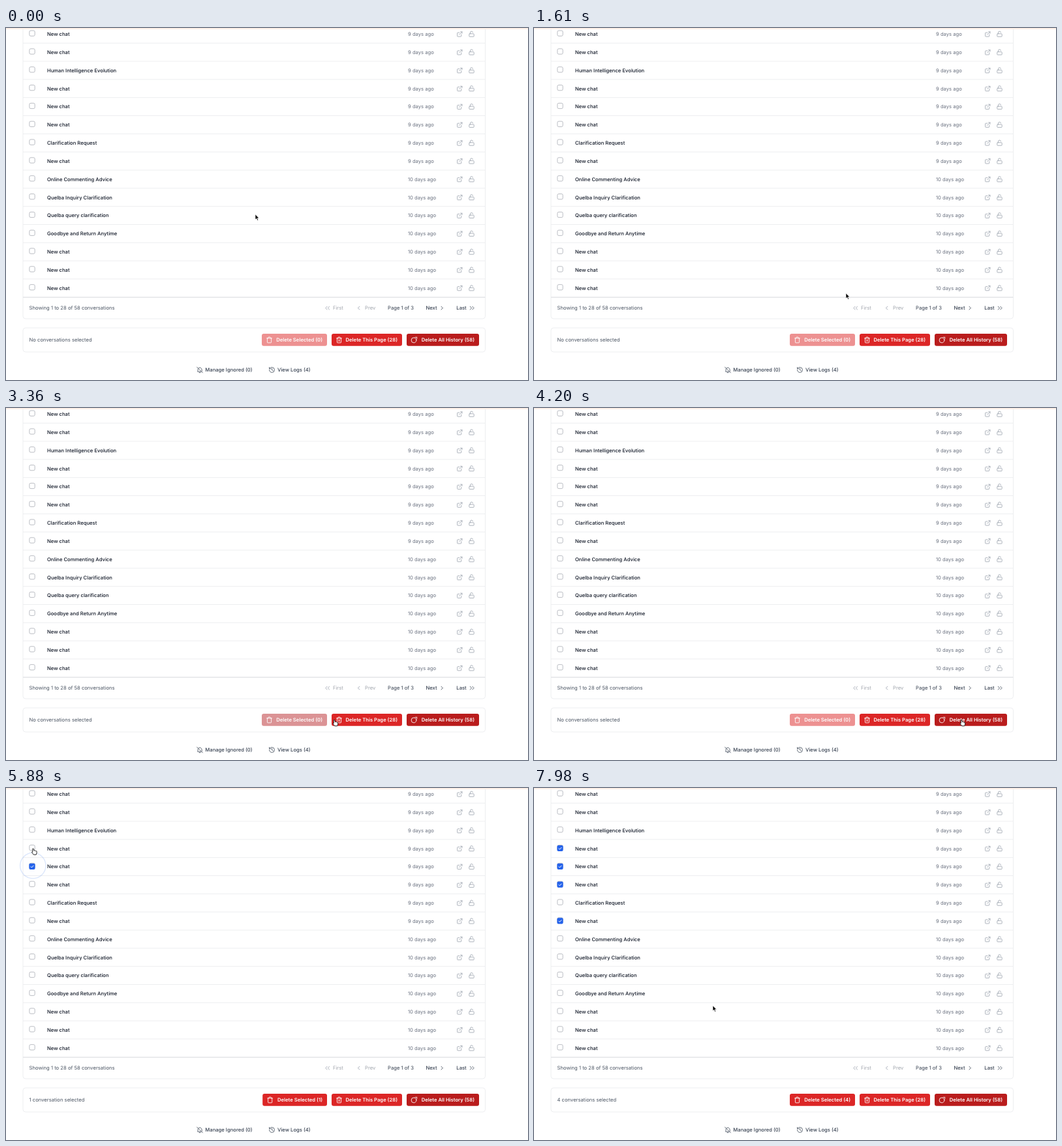
These frames come from a looping animation (800x540 px, 8 s). An HTML page:

```html
<!DOCTYPE html>
<html lang="en">
<head>
<meta charset="utf-8">
<title>Conversation list</title>
<style>
html, body { margin: 0; width: 100%; height: 100%; overflow: hidden; background: #fff; }
svg { display: block; width: 800px; height: 540px; }
text { font: 400 7.66px Inter, sans-serif; fill: #4b5563; white-space: pre; text-rendering: geometricPrecision; }
.title { font-weight: 500; fill: #111827; }
.date { fill: #6b7280; }
.nav { font-weight: 500; fill: #374151; }
.off { font-weight: 400; fill: #a1a5ad; }
.label { font-weight: 600; fill: #fff; }
.icon { fill: none; stroke: #9ca3af; stroke-width: 2; stroke-linecap: round; stroke-linejoin: round; }
.dark { stroke: #4b5563; }
.white { stroke: #fff; }
.line { fill: none; stroke: #ebecef; stroke-width: .9; }
.box { fill: #fff; stroke: #a9adb4; stroke-width: .8; }
</style>
</head>
<body>
<svg id="stage" viewBox="0 0 800 540" xmlns="http://www.w3.org/2000/svg"></svg>
<script>
const LOOP = 8000, STEP = 70, ROW_TOP = 9.3, ROW_GAP = 27.83;
const stage = document.getElementById('stage');

const titles = Array(15).fill('New chat');
Object.assign(titles, {
  2: 'Human Intelligence Evolution', 6: 'Clarification Request',
  8: 'Online Commenting Advice', 9: 'Quelba Inquiry Clarification',
  10: 'Quelba query clarification', 11: 'Goodbye and Return Anytime'
});

const icons = {
  link: 'M15 3h6v6M10 14 21 3M18 13v6a2 2 0 0 1-2 2H5a2 2 0 0 1-2-2V8a2 2 0 0 1 2-2h6',
  lock: 'M5 11h14a2 2 0 0 1 2 2v7a2 2 0 0 1-2 2H5a2 2 0 0 1-2-2v-7a2 2 0 0 1 2-2M7 11V7a5 5 0 0 1 9.9-1',
  trash: 'M3 6h18M19 6v14a2 2 0 0 1-2 2H7a2 2 0 0 1-2-2V6M8 6V4a2 2 0 0 1 2-2h4a2 2 0 0 1 2 2v2',
  bomb: 'M20 13a9 9 0 1 1-18 0a9 9 0 0 1 18 0M14.4 4.6l1.9-1.9a2.4 2.4 0 0 1 3.4 0l1.6 1.6a2.4 2.4 0 0 1 0 3.4l-1.9 2M22 2l-1.5 1.5',
  muted: 'M2 2l20 20M9 4.5a7 7 0 0 1 10 6.5c0 2 .4 3.5 1 5M17 18H4c1-2 1.5-4 1.5-8a7 7 0 0 1 .8-3M10 21.5h4',
  history: 'M3 12a9 9 0 1 0 9-9 9.8 9.8 0 0 0-6.7 2.7L3 8M3 3v5h5M12 7v5l4 2'
};
icons.trashX = icons.trash + 'M10 11l4 6M14 11l-4 6';

function add(tag, attrs, parent = stage, content) {
  const el = document.createElementNS('http://www.w3.org/2000/svg', tag);
  for (const key in attrs) el.setAttribute(key, attrs[key]);
  if (content !== undefined) el.textContent = content;
  parent.append(el);
  return el;
}
const write = (x, y, content, cls = '', parent = stage) =>
  add('text', { x, y, class: cls }, parent, content);
const icon = (name, cx, cy, cls = '', parent = stage, size = 10.5) =>
  add('path', {
    d: icons[name], class: 'icon ' + cls,
    transform: `translate(${cx - size / 2} ${cy - size / 2}) scale(${size / 24})`
  }, parent);
const path = (d, cls) => add('path', { d, class: cls });
const rowY = i => ROW_TOP + ROW_GAP * i;

add('rect', { width: 800, height: 2, fill: '#fdf0e8' });
path('M26 2V442q0 4 4 4H730.5q4 0 4-4V2', 'line');
add('rect', { x: 26, y: 460, width: 708.5, height: 37, rx: 4, class: 'line' });

const rows = titles.map((title, i) => {
  const y = rowY(i);
  path(`M26 ${y + 13.9}H734.5`, 'line');
  add('rect', { x: 35.9, y: y - 5.3, width: 8.3, height: 8.3, rx: 2, class: 'box' });
  write(63, y + 2.8, title, 'title');
  write(616, y + 2.8, (i < 8 ? 9 : 10) + ' days ago', 'date');
  icon('link', 695.3, y + .2, '', stage, 9.8);
  icon('lock', 713.5, y - .1, '', stage, 9.8);
  const mark = add('g', { visibility: 'hidden' });
  add('rect', { x: 35.4, y: y - 4.9, width: 9.2, height: 9.2, rx: 2, fill: '#2563eb' }, mark);
  add('path', {
    d: `M37.8 ${y - .2}l1.6 1.6 2.9-3.1`, fill: 'none', stroke: '#fff', 'stroke-width': 1
  }, mark);
  return mark;
});
add('path', { d: 'M26 413.2H734.5', stroke: '#dfe1e5' });

write(35.5, 432.4, 'Showing 1 to 28 of 58 conversations');
function chevrons(x, dir, count, cls) {
  for (let i = 0; i < count; i++)
    add('path', {
      d: `M${x + i * 3.4} 427.2l${dir * 2.4} 2.4l${-dir * 2.4} 2.4`,
      class: 'icon ' + cls, style: 'stroke-width:.9'
    });
}
chevrons(492.2, -1, 2, '');
write(501, 432.4, 'First', 'off');
chevrons(541.8, -1, 1, '');
write(550, 432.4, 'Prev', 'off');
write(585, 432.4, 'Page 1 of 3', 'nav').style.fontWeight = 400;
write(643.5, 432.4, 'Next', 'nav');
chevrons(667, 1, 1, 'dark');
write(690.3, 432.4, 'Last', 'nav');
chevrons(711.3, 1, 2, 'dark');

const summary = write(35.5, 481.2, '');

function button(left, right, fill, glyph, label) {
  const group = add('g', {});
  const rect = add('rect', { x: left, y: 469, width: right - left, height: 18.8, rx: 3, fill }, group);
  const sign = add('g', {}, group);
  icon(glyph, left + 11.5, 478.5, 'white', sign);
  const text = write(right - 7, 481.2, label, 'label', group);
  text.setAttribute('text-anchor', 'end');
  return { group, rect, sign, text };
}
const selected = button(392, 492, '#dc2626', 'trash', '');
button(499, 607, '#dc2626', 'trashX', 'Delete This Page (28)');
button(614, 725, '#b91c1c', 'bomb', 'Delete All History (58)');

icon('muted', 297, 524.5, 'dark');
write(305.3, 527.2, 'Manage Ignored (0)', 'nav');
icon('history', 407.5, 524.5, 'dark');
write(416, 527.2, 'View Logs (4)', 'nav');

const ripple = add('circle', { fill: '#3b82f6', 'fill-opacity': .03, stroke: '#5b8def', 'stroke-width': 1.4 });
const arrow = add('path', {
  d: 'M0 .8V9L1.9 7.3 3.2 10.3 4.6 9.7 3.3 6.8H5.9Z',
  fill: '#000', stroke: '#fff', 'stroke-width': .7, 'stroke-linejoin': 'round'
});
const hand = add('path', {
  d: 'M-.8.8q.8-1.3 1.6 0L1.4 3.6q1-.7 1.5.2 1-.5 1.4.4 1.3-.3 1.3 1V7.3L4.7 9.8H.8L-2 6.2q.1-1.2 1.3-.5Z',
  fill: '#fff', stroke: '#111', 'stroke-width': .9, 'stroke-linejoin': 'round'
});

// time, x, y: each leg is eased from stop to stop
const stops = [
  [0, 382, 285], [840, 382, 285], [1540, 478, 406], [1750, 478, 406], [2350, 445, 478],
  [2900, 445, 478], [3360, 503, 478], [3780, 655, 478], [4230, 655, 478],
  [5040, 42, 143], [5150, 42, 142], [5400, 41.5, 120], [5600, 41.5, 120],
  [5880, 41.5, 92.5], [6230, 41.5, 92.5], [6600, 41.5, 147], [6830, 41.5, 147],
  [7000, 43, 189], [7160, 41.5, 203], [7420, 41.5, 203], [7910, 274, 333], [8000, 274, 333]
];
const clicks = [[5470, 4], [6020, 3], [6780, 5], [7280, 7]];
const RIPPLE_TIME = 520, HOVER_LAG = 140;
const ease = p => p * p * (3 - 2 * p);
const inButton = (x, y, left, right) => y > 469 && y < 488 && x > left && x < right;

function cursorAt(t) {
  const i = stops.findIndex(s => s[0] > t);
  const [t0, x0, y0] = stops[i - 1], [t1, x1, y1] = stops[i];
  const p = ease((t - t0) / (t1 - t0));
  return [x0 + (x1 - x0) * p, y0 + (y1 - y0) * p];
}

function isClickable(x, y) {
  const onBox = x > 34 && x < 46 && titles.some((_, i) => Math.abs(y - rowY(i)) < 6.5);
  return onBox || inButton(x, y, 499, 607) || inButton(x, y, 614, 725);
}

function render(t) {
  const done = clicks.filter(c => c[0] <= t), n = done.length;
  rows.forEach((mark, i) =>
    mark.setAttribute('visibility', done.some(c => c[1] === i) ? 'visible' : 'hidden'));
  summary.textContent = `${n || 'No'} conversation${n === 1 ? '' : 's'} selected`;
  selected.text.textContent = `Delete Selected (${n})`;
  selected.group.setAttribute('opacity', n ? 1 : .5);
  const hovered = inButton(...cursorAt(Math.max(0, t - HOVER_LAG)), 392, 492);
  selected.rect.setAttribute('fill', hovered ? '#b92a2e' : '#dc2626');
  const inset = n === 1 ? 1.2 : 0;
  selected.rect.setAttribute('x', 392 + inset);
  selected.rect.setAttribute('width', 100 - inset);
  selected.sign.setAttribute('transform', `translate(${inset})`);

  const last = done[n - 1], p = last ? (t - last[0]) / RIPPLE_TIME : 1;
  ripple.setAttribute('visibility', p < 1 ? 'visible' : 'hidden');
  if (p < 1) {
    ripple.setAttribute('cx', 41.3);
    ripple.setAttribute('cy', rowY(last[1]) - 1.5);
    ripple.setAttribute('r', 4 + 16 * (1 - (1 - p) ** 2.6));
    ripple.setAttribute('opacity', 1 - p);
  }

  const [x, y] = cursorAt(t), over = isClickable(x, y);
  arrow.setAttribute('visibility', over ? 'hidden' : 'visible');
  hand.setAttribute('visibility', over ? 'visible' : 'hidden');
  (over ? hand : arrow).setAttribute('transform', `translate(${x} ${y})`);
}

function tick() {
  const t = performance.now() % LOOP;
  render(t - t % STEP);
  requestAnimationFrame(tick);
}
tick();
</script>
</body>
</html>
```
